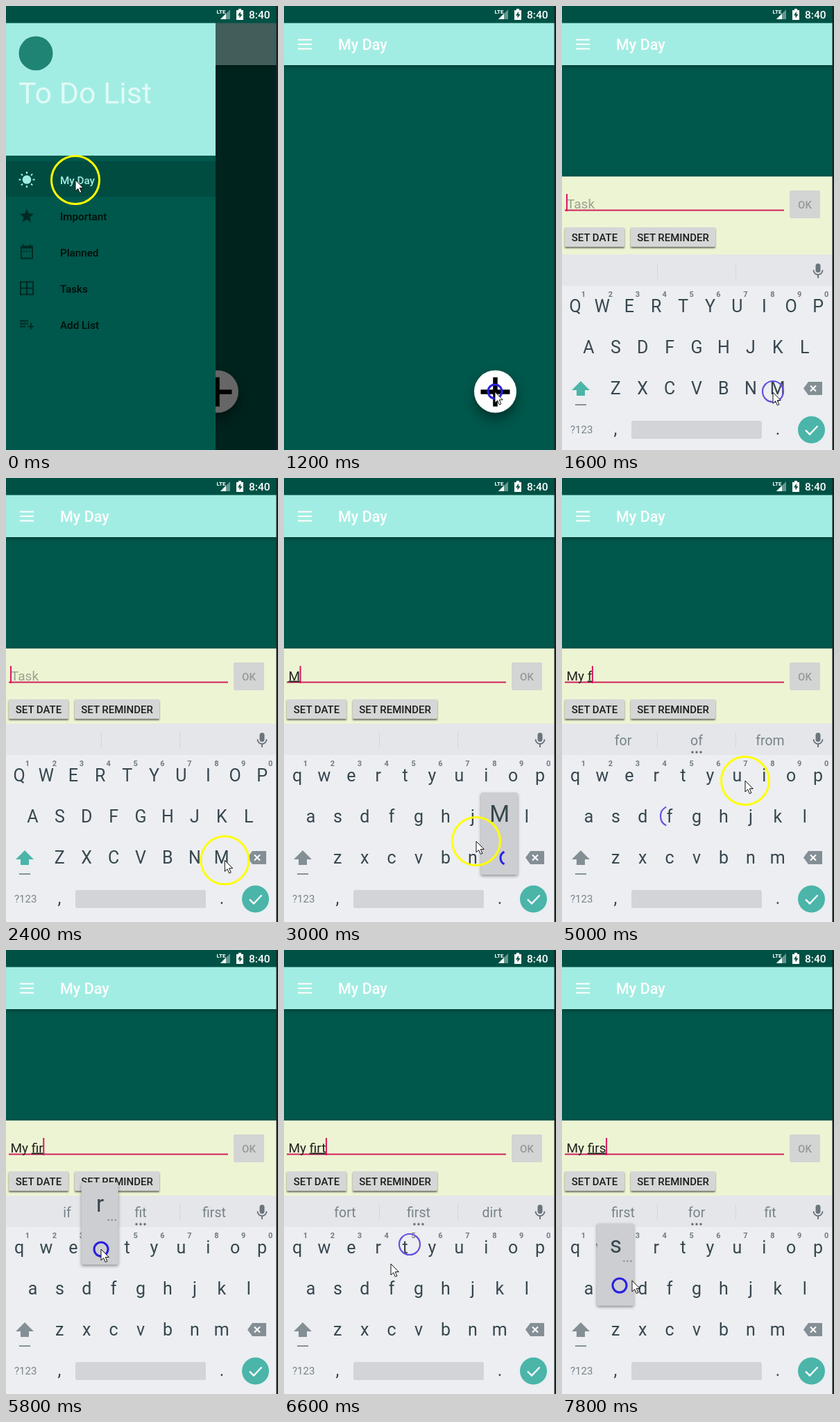
An HTML page that plays this animation: 392x638 px, repeating every 8 s.

```html
<!DOCTYPE html>
<html lang="en">
<head>
<meta charset="utf-8">
<title>To-do app</title>
<style>
  html, body { margin: 0; width: 100%; height: 100%; overflow: hidden; background: #00574b; }
  svg { display: block; width: 100%; height: 100%; font-family: Roboto, sans-serif; }
  text { white-space: pre; }
  .medium { font-weight: 500; }
  .mid { text-anchor: middle; }
  .line { fill: none; stroke: currentColor; }
  .fab { filter: drop-shadow(0 9px 8px #0006); }
  .bar { filter: drop-shadow(0 2px 2px #0005); }
  .button { fill: #d5d6d6; filter: drop-shadow(0 2px 1px #0008); }
  .popup { fill: #cdced1; filter: drop-shadow(0 2px 2px #0006); }
  #typed .word { text-decoration: underline; text-decoration-thickness: 1px; }
  #menu { font-size: 15.2px; color: #002a24; }
  #suggestions { font-size: 19.5px; fill: #78838a; }
  #keys { font-size: 25px; fill: #37474f; }
  #hints { font-size: 11px; font-weight: 700; fill: #707b82; }
</style>
</head>
<body>
<svg viewBox="0 0 392 638">
  <rect width="392" height="638" fill="#00574b"/>

  <g class="bar">
    <rect y="24" width="390" height="61" fill="#a2ede3"/>
  </g>
  <path d="M20 48.500h20M20 55h20M20 61.500h20" stroke="#fff" stroke-width="2.200"/>
  <text class="medium" x="78" y="63" font-size="21.500" fill="#fff">My Day</text>

  <g id="fab">
    <circle class="fab" cx="304.500" cy="554" r="30.500" fill="#fff"/>
    <path d="M283.500 554.500h42M304.500 533.500v42" stroke="#000" stroke-width="6.500"/>
  </g>

  <g id="panel">
    <rect y="245" width="390" height="393" fill="#edf4d3"/>
    <text id="placeholder" x="7" y="290.500" font-size="19" fill="#9ba18f">Task</text>
    <path d="M4 293.500h316" stroke="#d3205f" stroke-width="2"/>
    <text id="typed" x="6.500" y="290.500" font-size="19" fill="#1d211d"><tspan></tspan><tspan class="word"></tspan></text>
    <rect id="caret" y="270" width="2" height="25" fill="#d81b60"/>
    <rect x="328" y="265" width="44" height="40" rx="2" fill="#d3d4d4"/>
    <g class="medium" font-size="15" fill="#1c1c1c">
      <text class="mid" x="350" y="290.500" fill="#979898">OK</text>
      <rect class="button" x="4" y="318" width="86" height="28" rx="1"/>
      <text class="mid" x="47" y="338">SET DATE</text>
      <rect class="button" x="99" y="318" width="122" height="28" rx="1"/>
      <text class="mid" x="160" y="338">SET REMINDER</text>
    </g>
  </g>

  <g id="keyboard">
    <rect y="353" width="390" height="285" fill="#eceef1"/>
    <rect y="353" width="390" height="45" fill="#e4e6e9"/>
    <path d="M137.500 365v23M250.500 365v23" stroke="#d4d7da"/>
    <g fill="#6b767c">
      <rect x="365.500" y="366" width="7" height="13" rx="3.500"/>
      <path d="M362.500 375.500a6.500 6.500 0 0 0 13 0M369 382v5" fill="none" stroke="#6b767c" stroke-width="2"/>
    </g>
    <g id="suggestions" class="mid"></g>
    <g id="dots" fill="#5f6b72">
      <circle cx="188" cy="394" r="1.700"/><circle cx="194" cy="394" r="1.700"/><circle cx="200" cy="394" r="1.700"/>
    </g>
    <g id="keys" class="mid"></g>
    <g id="hints" class="mid"></g>
    <path id="shift" d="M27 535l13 13h-7v8h-12v-8h-7z"/>
    <path d="M19 569h16" stroke="#87929a" stroke-width="2"/>
    <path d="M355 536h20v19h-20l-7-9.500z" fill="#848f95"/>
    <path d="M358 541.500l8 8m0-8l-8 8" stroke="#fff" stroke-width="2"/>
    <text x="12" y="610" font-size="15" fill="#78838a">?123</text>
    <rect x="100" y="592" width="188" height="26" rx="3" fill="#d2d4d7"/>
    <g class="mid" font-size="25" fill="#37474f">
      <text x="77" y="612">,</text><text x="311" y="612">.</text>
    </g>
    <circle cx="359.500" cy="605" r="19.500" fill="#4bb5a9"/>
    <path d="M351 605.500l6 6 11.500-12" fill="none" stroke="#fff" stroke-width="2.400"/>
  </g>

  <g id="popup">
    <rect class="popup" x="-27" y="-102" width="53" height="118" rx="2"/>
    <text id="popupKey" class="mid" y="-60" font-size="33" fill="#37474f"></text>
    <g id="popupMore" fill="#8a9297">
      <circle cx="12" cy="-48" r="1.300"/><circle cx="17" cy="-48" r="1.300"/><circle cx="22" cy="-48" r="1.300"/>
    </g>
  </g>

  <rect id="scrim" y="24" width="390" height="614"/>
  <g id="drawer">
    <rect y="24" width="302" height="614" fill="#00574b"/>
    <rect y="24" width="302" height="191" fill="#a2ede3"/>
    <circle cx="43" cy="68" r="24.500" fill="#208474"/>
    <text x="18" y="140" font-size="43" fill="#e0faf6">To Do List</text>
    <rect y="223" width="302" height="51" fill="#004c41"/>
    <g id="menu" class="medium"></g>
  </g>

  <rect width="392" height="24.500" fill="#005145"/>
  <g fill="#fff">
    <text x="303.500" y="10.500" font-size="8" font-weight="700">LTE</text>
    <path d="M309 19h14v-14z" opacity=".4"/>
    <path d="M309 19h8v-8z"/>
    <path d="M332 6h3v-2h4v2h3v14h-10z"/>
    <path d="M338 8l-4 5.500h2.500v4l4-5.500h-2.500z" fill="#005145"/>
    <text class="medium" x="350" y="17.500" font-size="15.500">8:40</text>
  </g>
  <rect x="389.500" width="2.500" height="638" fill="#1a2425"/>

  <circle id="halo" r="34.500" fill="none" stroke="#ff0" stroke-width="3"/>
  <circle id="ring" fill="none" pathLength="4"/>
  <path id="cursor" d="M0 0v16l3.700-3.500 2.600 6 2.600-1.100-2.600-5.900h5z" fill="#fff" stroke="#111"/>
</svg>
<script>
const LOOP = 8000, STEP = 200;
const $ = id => document.getElementById(id);
const show = (id, on) => $(id).setAttribute('visibility', on ? 'visible' : 'hidden');
const place = (id, x, y) => $(id).setAttribute('transform', `translate(${x} ${y})`);
const set = (id, attrs) => Object.entries(attrs).forEach(([k, v]) => $(id).setAttribute(k, v));
const textAt = (x, y, s) => `<text x="${x}" y="${y}">${s}</text>`;

// Keyboard
const rows = [['qwertyuiop', 19, 436], ['asdfghjkl', 38.5, 495], ['zxcvbnm', 77.3, 554]];
const keyPos = {};
for (const [letters, x0, y] of rows)
  [...letters].forEach((c, i) => keyPos[c] = [x0 + 38.9 * i, y]);
$('keys').innerHTML = Object.entries(keyPos).map(([c, p]) => textAt(...p, c)).join('');
$('hints').innerHTML = [...'1234567890'].map((d, i) => textAt(31 + 38.9 * i, 414, d)).join('');
$('suggestions').innerHTML = [88, 194, 300].map(x => textAt(x, 384, '')).join('');

// Drawer menu
const rays = Array.from({length: 8}, (_, i) =>
  `<path d="M12 .5v3" stroke="currentColor" stroke-width="2" transform="rotate(${i * 45} 12 12)"/>`).join('');
const menu = [
  ['My Day', `<circle cx="12" cy="12" r="6.300" fill="currentColor"/>${rays}`],
  ['Important', '<path fill="currentColor" d="M12 17.300L18.200 21l-1.700-7L22 9.200l-7.200-.6L12 2 9.200 8.600 2 9.200 7.500 14 5.800 21z"/>'],
  ['Planned', '<path class="line" stroke-width="2" d="M4 4h16v17h-16zM7 1v3M17 1v3M4 6h16M7 11h2m2 0h2m2 0h2"/>'],
  ['Tasks', '<path class="line" stroke-width="2" d="M3 3h18v18h-18zM12 3v18M3 12h18"/>'],
  ['Add List', '<path class="line" stroke-width="2" d="M2 7h12M2 11h12M2 15h8M18 10v9M13.500 15h8.500"/>']
];
$('menu').innerHTML = menu.map(([label, icon], i) => {
  const y = 250 + 52 * i;
  return `<g${i ? '' : ' color="#a2ede3"'}><g transform="translate(18 ${y - 12.5})">${icon}</g>
    <text x="78" y="${y + 5.5}" fill="${i ? '#000d0a' : '#a2ede3'}">${label}</text></g>`;
}).join('');

// Pointer path: time, x, y
const path = [
  [0, 100, 250], [400, 100, 250], [1000, 304, 554], [2000, 304, 556], [2600, 321, 546],
  [2800, 321, 546], [3000, 277, 522], [3400, 216, 432], [3600, 216, 432], [4000, 195, 606],
  [4200, 195, 606], [4600, 157, 486], [4800, 157, 486], [5000, 264, 435], [5200, 290, 430],
  [5400, 290, 430], [5800, 137, 430], [6000, 137, 430], [6200, 181, 423], [6400, 181, 423],
  [6600, 154, 451], [6800, 84, 482], [7000, 357, 545], [7200, 361, 546], [7400, 346, 540],
  [7600, 180, 500], [7800, 101, 475]
];
const presses = [
  {at: 200, hold: 0, x: 100, y: 250, text: ''},
  {at: 1200, hold: 200, x: 304, y: 554, text: ''},
  {at: 2800, hold: 200, x: 322, y: 546, key: 'M', text: 'M', words: 'My Me Mr'},
  {at: 3400, hold: 200, x: 216, y: 430, key: 'y', text: 'My', words: 'May My Mt'},
  {at: 4000, hold: 200, x: 195, y: 606, text: 'My ', words: 'name phone own'},
  {at: 4600, hold: 200, x: 157, y: 486, key: 'f', text: 'My f', words: 'for of from'},
  {at: 5200, hold: 200, x: 290, y: 430, key: 'i', text: 'My fi', words: 'if fit first'},
  {at: 5800, hold: 200, x: 137, y: 430, key: 'r', text: 'My fir', words: 'first for fit'},
  {at: 6200, hold: 200, x: 181, y: 423, key: 't', text: 'My firt', words: 'fort first dirt'},
  {at: 7200, hold: 0, x: 361, y: 546, text: 'My fir', words: 'first for fit'},
  {at: 7800, hold: 0, x: 83, y: 482, key: 's', text: 'My firs', words: 'first for fit'}
];
const lastPress = t => presses.findLast(p => p.at <= t);

function pointerAt(t) {
  const i = path.findIndex(p => p[0] > t);
  if (i < 0) return path.at(-1).slice(1);
  const [t0, x0, y0] = path[i - 1], [t1, x1, y1] = path[i], k = (t - t0) / (t1 - t0);
  return [x0 + (x1 - x0) * k, y0 + (y1 - y0) * k];
}

function drawPointer(t, press) {
  const [x, y] = pointerAt(t);
  place('cursor', x, y);
  place('halo', x, y);
  const age = press ? t - press.at : Infinity;
  const ringOn = press && age <= press.hold + STEP;
  const away = ringOn && Math.hypot(x - press.x, y - press.y) > 45;
  show('halo', !ringOn || away);
  show('ring', ringOn);
  if (!ringOn) return;
  const held = age <= press.hold;
  set('ring', {
    cx: press.x, cy: press.y, r: held ? 10 : 15,
    stroke: held ? '#2a20e0' : '#6550e0',
    'stroke-width': held ? 3 : 2.2,
    'stroke-dasharray': away ? '0 1.3 1.4 9' : 'none'
  });
}

function drawEntry(t, press) {
  const text = press ? press.text : '';
  const cut = text.lastIndexOf(' ') + 1;
  const [done, word] = $('typed').children;
  done.textContent = text.slice(0, cut);
  word.textContent = text.slice(cut);
  show('placeholder', t >= 1400 && !text);
  $('caret').setAttribute('x', 6 + (text ? $('typed').getComputedTextLength() : 0));

  const words = (lastPress(t - 400)?.words || '').split(' ');
  [...$('suggestions').children].forEach((el, i) => el.textContent = words[i] || '');
  show('dots', t >= 1400 && words.length > 1);

  const popup = press && press.key && t <= press.at + press.hold;
  show('popup', popup);
  show('popupMore', popup && 'yirts'.includes(press.key));
  if (popup) {
    place('popup', ...keyPos[press.key.toLowerCase()]);
    $('popupKey').textContent = press.key;
  }
}

function draw(t) {
  const press = lastPress(t);
  const open = Math.max(0, Math.min(1, (600 - t) / 400));
  place('drawer', -302 * (1 - open), 0);
  $('scrim').setAttribute('opacity', 0.6 * open);

  const typing = t >= 1400;
  show('fab', !typing);
  show('panel', typing);
  show('keyboard', typing);
  place('keyboard', 0, t < 1600 ? 120 : t < 1800 ? 4 : 0);
  const upper = t < 3000;
  Object.keys(keyPos).forEach((c, i) => $('keys').children[i].textContent = upper ? c.toUpperCase() : c);
  $('shift').setAttribute('fill', upper ? '#4bb5a9' : '#848f95');

  drawEntry(t, press);
  drawPointer(t, press);
}

const start = performance.now();
let shown = -1;
function tick() {
  const t = Math.floor((performance.now() - start) % LOOP / STEP) * STEP;
  if (t !== shown) draw(shown = t);
  requestAnimationFrame(tick);
}
tick();
</script>
</body>
</html>
```
